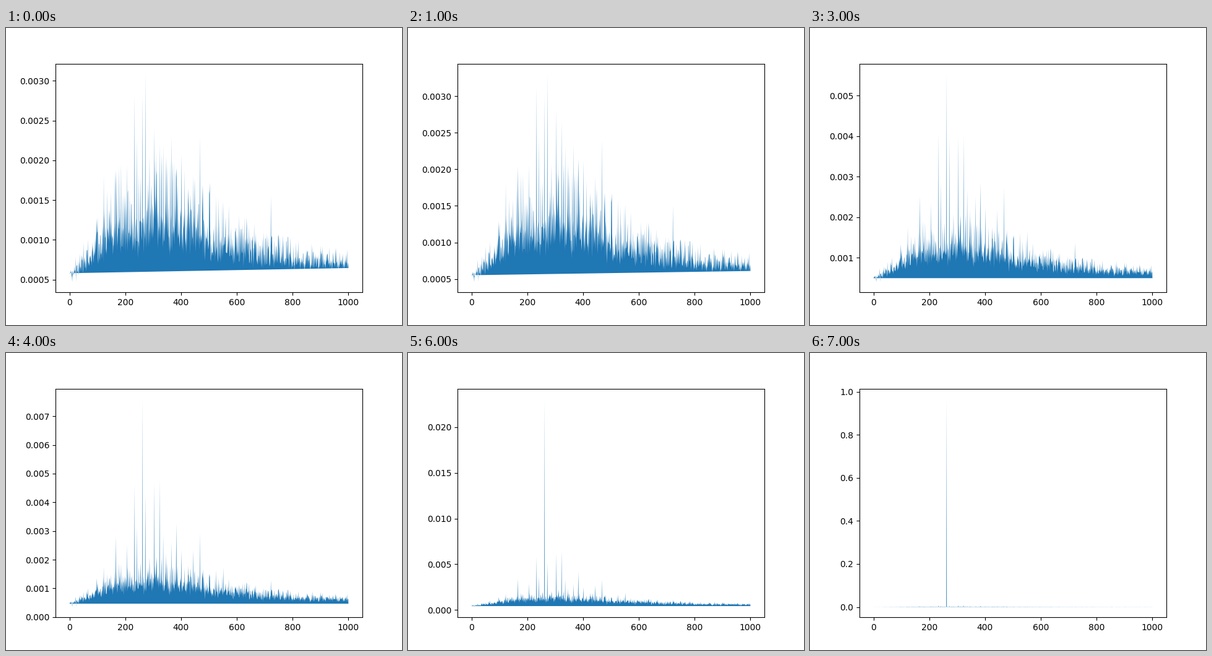
Recreate the animation shown at these times as a matplotlib script. Size 640 by 480 pixels, loop 8 s.

```python
import matplotlib.pyplot as plt
import numpy as np
from matplotlib.animation import FuncAnimation

STEPS = 8
MILLI = 1e-3
WINNER = 262
DIPS = [10, 24]

# Tall spikes: position, height at step 0 and at step 5, in thousandths
SPIKES = [
    (123, 1.80, 1.75), (166, 1.87, 3.1), (206, 1.95, 2.7), (233, 2.81, 5.2),
    (242, 2.27, 3.4), (272, 3.086, 4.7), (304, 2.40, 5.4), (323, 2.20, 5.6),
    (336, 2.19, 3.1), (366, 2.30, 2.7), (383, 1.90, 3.7), (401, 2.07, 2.4),
    (443, 1.81, 2.5), (468, 2.29, 3.1), (503, 1.72, 1.4), (552, 1.48, 1.8),
    (722, 1.55, 1.2),
]

x = np.arange(1001)
bell = (x / 270 * np.exp(1 - x / 270)) ** 2
floor = .51 + .2 * bell + .07 * x / 1000
spread = .03 + .17 * bell

rng = np.random.default_rng(7)
noise_a, noise_b = np.minimum(rng.gamma(3, 1, (2, len(x))), 7)


def winner(step):
    # The winning probability grows as its reciprocal runs down to one
    return 1 / np.interp(step, [0, 1, 3, 4, 5, 7],
                         [.3546, .333, .1808, .1316, .0856, .001035])


def heights(step):
    base = .58 - .028 * step
    tilt = .065 * max(0, 1 - (step / 3) ** 2)
    lowest = np.interp(step, [0, 2, 4, 7], [.47, .45, .355, .3])
    mix = step / 14
    noise = (1 - mix) * noise_a + mix * noise_b

    y = floor * base / .58 + spread * (1 + .06 * step) * noise
    for pos, start, end in SPIKES:
        y[pos] = start + (end - start) * (step / 5) ** 1.25
    y = np.maximum(y, lowest)
    y[DIPS] = lowest
    y[0], y[-1] = base, base + tilt
    y[WINNER] = winner(step)
    return y * MILLI


def draw(step):
    ax.clear()
    ax.fill(x, heights(step))


fig, ax = plt.subplots(figsize=(6.4, 4.8), dpi=100)
anim = FuncAnimation(fig, draw, frames=STEPS, interval=1000, repeat=True)
plt.show()
```
